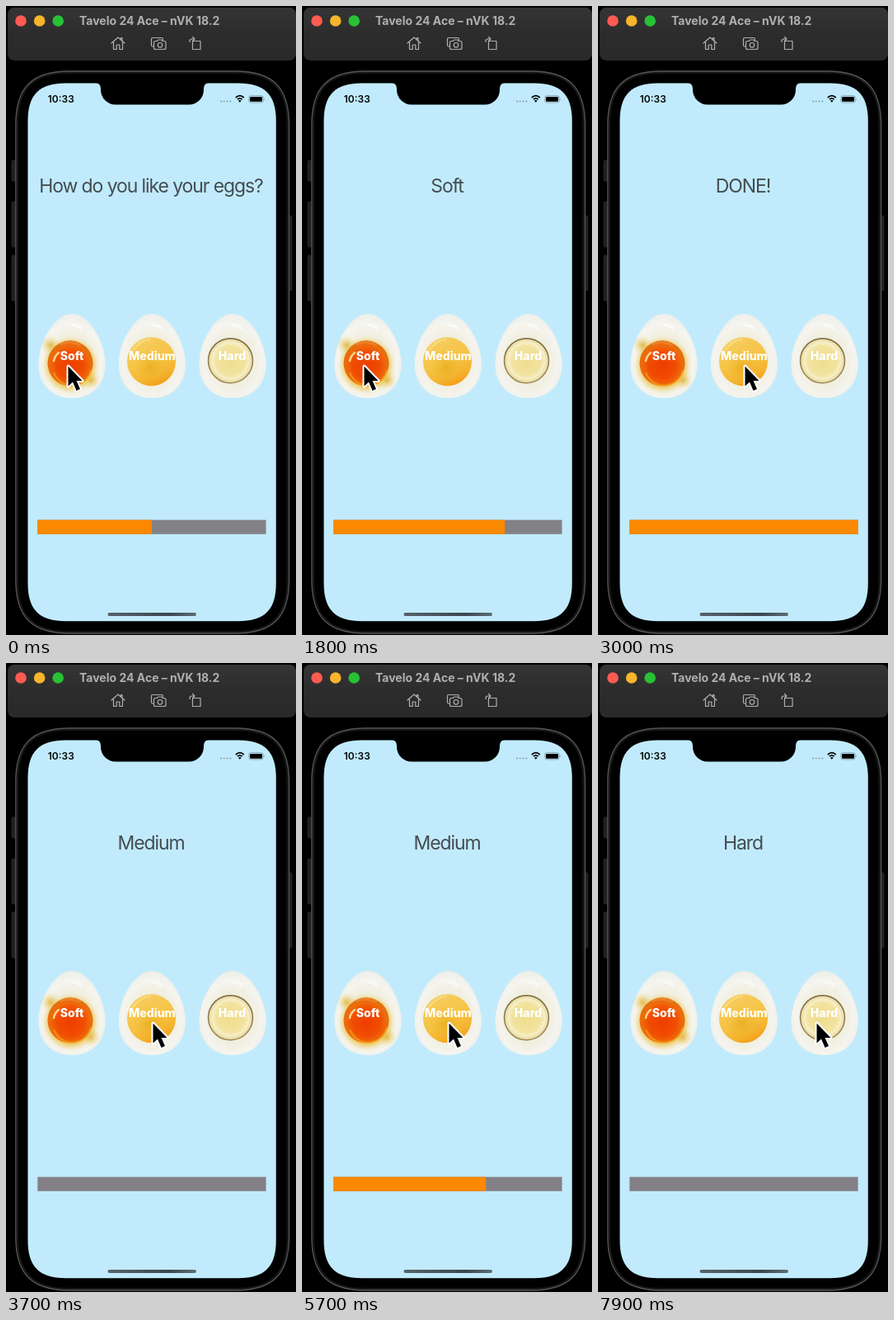
Recreate the animation shown at these times as an HTML page. Size 352x762 px, loop 8000 ms.

```html
<!DOCTYPE html>
<html lang="en">
<head>
<meta charset="utf-8">
<title>Egg timer</title>
<style>
  html, body { margin: 0; width: 100%; height: 100%; overflow: hidden; background: #000; }
  svg { display: block; width: 352px; height: 762px; }
  text { font-family: Inter, Roboto, sans-serif; }
  .title { font-size: 14px; font-weight: 700; fill: #b0afb0; }
  .clock { font-size: 12px; font-weight: 600; fill: #050607; }
  .heading { font-size: 23px; letter-spacing: -1.1px; fill: #454c51; text-anchor: middle; }
  .label { font-size: 14.1px; font-weight: 800; fill: #fff; text-anchor: middle; }
  .icon { fill: none; stroke: #b0afb0; stroke-width: 1.2; stroke-linejoin: round; stroke-linecap: round; }
</style>
</head>
<body>
<svg viewBox="0 0 352 762">
  <defs>
    <linearGradient id="toolbar" x2="0" y2="1">
      <stop offset="0" stop-color="#363536"/><stop offset=".5" stop-color="#2d2c2d"/><stop offset="1" stop-color="#2a292a"/>
    </linearGradient>
    <radialGradient id="white" cy=".55" r=".55">
      <stop offset=".5" stop-color="#f0eedd"/><stop offset=".8" stop-color="#f5f4ee"/><stop offset="1" stop-color="#eeefe9"/>
    </radialGradient>
    <radialGradient id="glow">
      <stop offset=".7" stop-color="#efb52c" stop-opacity=".8"/><stop offset=".84" stop-color="#eed070" stop-opacity=".5"/><stop offset="1" stop-color="#f3edcb" stop-opacity="0"/>
    </radialGradient>
    <radialGradient id="spill">
      <stop offset="0" stop-color="#dfae22" stop-opacity=".8"/><stop offset="1" stop-color="#ecd47c" stop-opacity="0"/>
    </radialGradient>
    <radialGradient id="soft" cy=".55">
      <stop offset="0" stop-color="#ee3d00"/><stop offset=".6" stop-color="#f04d02"/><stop offset=".88" stop-color="#ef6a0c"/><stop offset="1" stop-color="#e2700f"/>
    </radialGradient>
    <linearGradient id="medium" x1=".25" x2=".7" y2="1">
      <stop offset="0" stop-color="#f6cd62"/><stop offset=".5" stop-color="#f6c445"/><stop offset=".8" stop-color="#f4b32f"/><stop offset="1" stop-color="#f49a14"/>
    </linearGradient>
    <radialGradient id="core">
      <stop offset="0" stop-color="#e6ab1a" stop-opacity=".75"/><stop offset="1" stop-color="#efb62c" stop-opacity="0"/>
    </radialGradient>
    <radialGradient id="hard">
      <stop offset="0" stop-color="#efdd8c"/><stop offset=".65" stop-color="#f1e39f"/><stop offset=".8" stop-color="#f5ecc0"/><stop offset="1" stop-color="#e6d8a2"/>
    </radialGradient>
    <linearGradient id="rim" x2="0" y2="1">
      <stop offset="0" stop-color="#79683f"/><stop offset="1" stop-color="#a08a52"/>
    </linearGradient>
    <linearGradient id="indicator">
      <stop offset="0" stop-color="#55636b"/><stop offset=".7" stop-color="#3a474f"/><stop offset="1" stop-color="#5d6e77"/>
    </linearGradient>
    <path id="egg" fill="url(#white)" d="M80 373C101 373 120.500 407 120.500 434C120.500 460 103 475 80 475S39.500 460 39.500 434C39.500 407 59 373 80 373Z"/>
    <path id="shine" fill="none" stroke="#fff" stroke-width="3" stroke-linecap="round" opacity=".6" d="M80 387q7-1 11 4"/>
  </defs>

  <!-- window toolbar -->
  <rect x="2" y="2" width="350" height="64" rx="8" fill="url(#toolbar)"/>
  <circle cx="18" cy="18" r="6.8" fill="#fe5b52"/>
  <circle cx="40.7" cy="18" r="6.8" fill="#f7b52c"/>
  <circle cx="63.2" cy="18" r="6.8" fill="#28c136"/>
  <text class="title" x="89" y="22.5">Tavelo 24 Ace – nVK 18.2</text>
  <g class="icon">
    <path d="M128 45l8-7 8 7M130.500 43.500V52.500h3.700v-5.500h3.600v5.500h3.700V43.500M141 41.500v-3h-1.500v1.500"/>
    <path d="M179 49h-1a1.500 1.500 0 0 1-1.500-1.500V40a1.500 1.500 0 0 1 1.500-1.500h11a1.500 1.500 0 0 1 1.500 1.500v1"/>
    <path d="M181.500 42.500h2l1-1.500h4.500l1 1.500h2q2 0 2 2v6q0 2-2 2h-10.500q-2 0-2-2v-6q0-2 2-2z"/>
    <circle cx="187" cy="47.300" r="2.800"/>
    <path d="M226.500 42.500h9.500v10h-9.500zM223 43.500v-1q0-2.500 3-2.500h2.500M226.500 37.500l2.500 2.500-2.500 2.500"/>
  </g>

  <!-- phone body -->
  <g fill="#202021" stroke="#343435" stroke-width=".6">
    <rect x="7" y="187" width="5" height="25" rx="1.500"/>
    <rect x="7" y="237" width="5" height="55" rx="1.500"/>
    <rect x="7" y="302" width="5" height="55" rx="1.500"/>
    <rect x="342" y="254" width="5" height="91" rx="1.500"/>
  </g>
  <path id="shell" fill="#171718" stroke="#555556" stroke-width="1.300"/>
  <path id="bezel"/>
  <path id="screen" fill="#c1ebfc"/>
  <path d="M109 93Q115 94 115 100V101.500A18 18 0 0 0 133 119.500H222A18 18 0 0 0 240 101.500V100Q240 94 246 93Z"/>

  <!-- status bar -->
  <text class="clock" x="50.800" y="116.800">10:33</text>
  <path d="M261 115.500h12" stroke="#86a3af" stroke-width="2.200" stroke-dasharray="0 3.700" stroke-linecap="round"/>
  <path d="M278.800 111q5-4.600 10 0M280.900 113.200q2.900-2.600 5.800 0" fill="none" stroke="#000" stroke-width="1.700"/>
  <path d="M281.900 114.700q1.900-1.500 3.800 0l-1.900 2z"/>
  <rect x="294.800" y="108.700" width="17.400" height="8.200" rx="2.400" fill="none" stroke="#7d98a4" stroke-width=".9"/>
  <rect x="296" y="109.900" width="15" height="5.800" rx="1.300"/>
  <path d="M313.400 111.300q1.500 1.500 0 3z" fill="#6f8792"/>

  <text class="heading" id="heading" x="176" y="226"></text>

  <!-- eggs -->
  <g>
    <use href="#egg"/><use href="#shine"/>
    <circle cx="78.500" cy="435" r="36" fill="url(#glow)"/>
    <circle cx="54" cy="411" r="12" fill="url(#spill)"/>
    <circle cx="103" cy="453" r="12" fill="url(#spill)"/>
    <circle cx="78" cy="432.800" r="27.500" fill="url(#soft)"/>
    <path d="M58 444q7 16 23 15.500 17-1 22-18" fill="none" stroke="#f5a316" stroke-width="2" opacity=".7"/>
    <path d="M65 410q13-6 26 1" fill="none" stroke="#f79042" stroke-width="3" opacity=".5"/>
    <path d="M58 430q1-6 6-10" fill="none" stroke="#fbd48b" stroke-width="2.500" stroke-linecap="round"/>
    <text class="label" x="80" y="429">Soft</text>
  </g>
  <g>
    <use href="#egg" x="97.300"/><use href="#shine" x="97.300"/>
    <circle cx="176.500" cy="430.700" r="29.500" fill="url(#medium)"/>
    <circle cx="175" cy="437" r="20" fill="url(#core)"/>
    <path d="M153 419q7-13 21-15" fill="none" stroke="#fbe08e" stroke-width="3" opacity=".6" stroke-linecap="round"/>
    <text class="label" x="177.300" y="429">Medium</text>
  </g>
  <g>
    <use href="#egg" x="195"/><use href="#shine" x="195"/>
    <circle cx="272.500" cy="429.700" r="27" fill="url(#hard)" stroke="url(#rim)" stroke-width="1.500"/>
    <circle cx="272.500" cy="429.500" r="22" fill="none" stroke="#faf2cf" stroke-width="1.500" opacity=".6"/>
    <text class="label" x="274.500" y="429">Hard</text>
  </g>

  <!-- progress and home indicator -->
  <rect x="38.300" y="622.600" width="277.300" height="17.200" fill="#838086"/>
  <rect id="bar" x="38.300" y="622.600" height="17.200" fill="#fc8800"/>
  <rect x="123.500" y="735" width="107.500" height="4" rx="2" fill="url(#indicator)"/>

  <path id="cursor" d="M0 0V24L5.500 19 10 29.500 14.500 27.500 10 17.500H17Z" stroke="#fff" stroke-width="4" paint-order="stroke" stroke-linejoin="round"/>
</svg>
<script>
  const LOOP = 8000, FRAME = 100, BAR_WIDTH = 277.3;
  const headings = [
    [0, "How do you like your eggs?"], [200, "Soft"], [2700, "DONE!"],
    [3700, "Medium"], [7200, "DONE!"], [7900, "Hard"]
  ];
  const progress = [
    [0, 1 / 2],
    [200, 0], [700, 1 / 4], [1200, 2 / 4], [1700, 3 / 4], [2200, 1],
    [3700, 0], [4100, 1 / 6], [4600, 2 / 6], [5200, 3 / 6], [5700, 4 / 6], [6200, 5 / 6], [6700, 1],
    [7900, 0]
  ];
  const byId = id => document.getElementById(id);
  const [heading, bar, cursor] = ["heading", "bar", "cursor"].map(byId);

  // Rectangle whose corners ease into the sides; r is the reach of each corner.
  function smoothRect(id, left, top, right, bottom, r) {
    const k = r * 0.7, s = r - k;
    byId(id).setAttribute("d", `M${left + r} ${top}H${right - r}c${k} 0 ${r} ${s} ${r} ${r}V${bottom - r}` +
      `c0 ${k} ${-s} ${r} ${-r} ${r}H${left + r}c${-k} 0 ${-r} ${-s} ${-r} ${-r}V${top + r}c0 ${-k} ${s} ${-r} ${r} ${-r}Z`);
  }
  smoothRect("shell", 11.8, 79, 343.6, 760, 65);
  smoothRect("bezel", 15, 82, 340.5, 757, 61);
  smoothRect("screen", 26.5, 93.5, 327.8, 745.2, 46);

  const valueAt = (steps, t) => steps.findLast(([start]) => start <= t)[1];
  const ease = (t, start, end) => {
    const p = Math.min(1, Math.max(0, (t - start) / (end - start)));
    return p * p * (3 - 2 * p);
  };

  function draw(now) {
    const t = Math.floor(now % LOOP / FRAME) * FRAME;
    heading.textContent = valueAt(headings, t);
    bar.setAttribute("width", BAR_WIDTH * valueAt(progress, t));
    const x = 75.5 + 95 * ease(t, 1900, 2300) + 8 * ease(t, 2300, 2600) + 87 * ease(t, 7300, 7700);
    cursor.setAttribute("transform", `translate(${x} 436.5)`);
    requestAnimationFrame(draw);
  }
  draw(performance.now());
</script>
</body>
</html>
```
